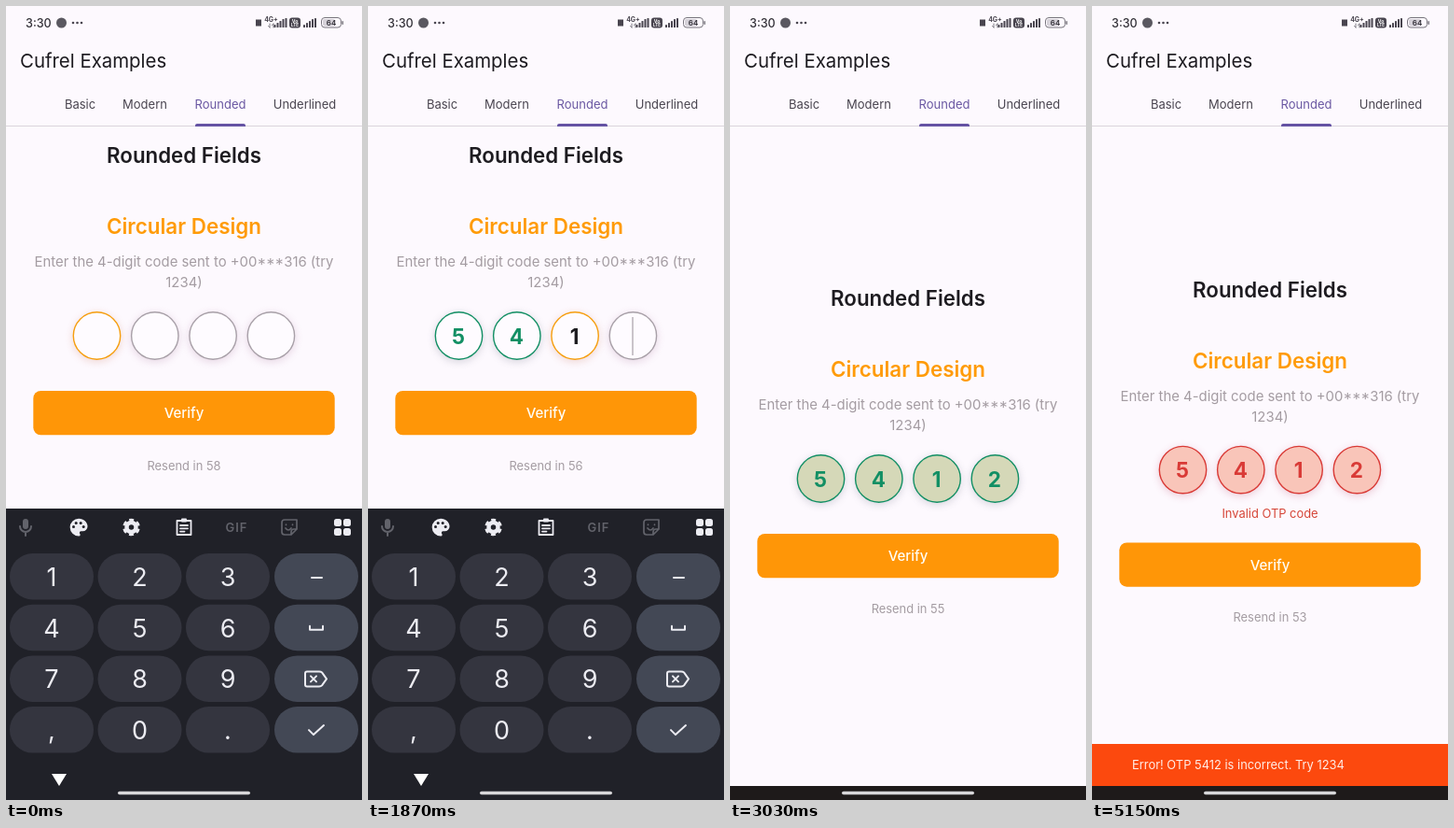
These frames come from a looping animation (382 px wide and 850 px high, 5.19 s). An HTML page:

```html
<!DOCTYPE html>
<html lang="en">
<head>
<meta charset="utf-8">
<title>One-time code entry</title>
<style>
html, body { margin: 0; height: 100%; overflow: hidden; background: #fdf9fe; }
svg { display: block; width: 100vw; height: 100vh; font-family: Inter, Roboto, sans-serif; }
.line { fill: none; stroke: currentColor; stroke-width: 2; stroke-linecap: round; stroke-linejoin: round; }
</style>
</head>
<body>
<svg id="stage" viewBox="0 0 382 850"></svg>
<script>
const LOOP = 5190;
const stage = document.getElementById('stage');

const typed = [700, 1300, 1780, 2540];
const digits = '5412';
const hideAt = 2575, tapAt = 4260, errorAt = 4360, snackAt = 4381;

const page = '#fdf9fe', title = '#1d1b20', label = '#49454f', muted = '#a49ca2';
const board = '#202128', keyFill = '#34353f', enterFill = '#434855';
const glyph = '#ececf2', dimGlyph = '#62636b';

const paper = [254, 251, 255], dark = [29, 27, 32], grey = [168, 160, 168];
const orange = [246, 158, 14], green = [18, 143, 100], red = [217, 58, 54];
const mint = [198, 225, 192], sand = [213, 216, 184], pink = [249, 197, 185];

const ramp = (t, from, to) => Math.min(1, Math.max(0, (t - from) / (to - from)));
const easeOut = p => 1 - (1 - p) ** 3;
const mix = (a, b, p) => a.map((v, i) => v + (b[i] - v) * p);
const rgb = c => `rgb(${c.map(Math.round)})`;

// Text whose capitals are centred on y
const text = (s, x, y, size, fill, weight = 400, anchor = 'middle') =>
  `<text x="${x}" y="${y + size * .363}" font-size="${size}" fill="${fill}" font-weight="${weight}" text-anchor="${anchor}">${s}</text>`;
const rect = (x, y, w, h, r, fill, more = '') =>
  `<rect x="${x}" y="${y}" width="${w}" height="${h}" rx="${r}" fill="${fill}" ${more}/>`;
const circle = (x, y, r, fill, more = '') =>
  `<circle cx="${x}" cy="${y}" r="${r}" fill="${fill}" ${more}/>`;
const line = (d, more = '') => `<path class="line" d="${d}" ${more}/>`;
const group = (x, y, body, more = '') => `<g transform="translate(${x} ${y})" ${more}>${body}</g>`;

const bars = x => [3, 5, 7, 9, 10].map((h, i) => rect(x + i * 3, 23 - h, 2, h, .6, label)).join('');

const header =
  text('3:30', 21, 18, 12.6, '#333138', 500, 'start') +
  circle(59.5, 18, 5.5, '#5a5860') +
  [72, 76.5, 81].map(x => circle(x, 18, 1.3, label)).join('') +
  rect(268, 14.5, 6, 7, 0, label) +
  text('4G+', 284.5, 14.5, 7, label, 700) +
  line('M283 19v4m-1.5-1.5l1.5 1.5M287 23v-4m-1.5 1.5l1.5-1.5', 'style="color:#7d7a82;stroke-width:1"') +
  bars(287.5) +
  rect(304, 12.5, 12, 11, 3, label) +
  text('Vo', 310, 16, 5, '#fff', 700) + text('LTE', 310, 20.5, 4.5, '#fff', 700) +
  bars(319) +
  rect(338.5, 12.5, 21, 10.5, 3.5, page, 'stroke="#77747c"') +
  rect(340, 14, 13, 7.5, 2, '#d5d1d8') + rect(360.5, 16, 1.5, 4, .7, '#77747c') +
  text('64', 349, 18, 8, '#333138', 600) +
  text('Cufrel Examples', 15, 58.5, 20.4, title, 400, 'start') +
  [['Basic', 79.5], ['Modern', 149], ['Rounded', 230], ['Underlined', 320.5]]
    .map(([s, x]) => text(s, x, 105.5, 13, s == 'Rounded' ? '#6a58a2' : label)).join('') +
  rect(0, 128, 382, 1, 0, '#dbd5dc') +
  '<path d="M203 129v-1q0-2 2-2h50q2 0 2 2v1z" fill="#6553a4"/>';

const icon = (x, color, body) => group(x, 558, body, `style="color:${color}"`);

const palette =
  '<path transform="translate(-12.5 -12.5) scale(1.05)" fill="currentColor" d="M12 3a9 9 0 0 0 0 18q1.5 0 1.5-1.5c0-1-.8-1-.8-2q0-1.5 1.5-1.5H16a5 5 0 0 0 5-5c0-4.4-4-8-9-8z"/>' +
  [[-5.5, -.5], [-2.8, -4.5], [2.2, -4.5], [5.2, -.5]].map(([x, y]) => circle(x, y, 1.5, board)).join('');
const gear = '<g fill="none" stroke="currentColor"><circle r="5" stroke-width="4.5"/>' +
  '<circle r="7.8" stroke-width="3" stroke-dasharray="4.8 3.368" transform="rotate(12)"/></g>';
const clipboard = line('M-7.5-7h15v15h-15zM-4-2h8M-4 1.3h8M-4 4.6h4.5', 'style="stroke-width:1.8"') +
  rect(-3, -9.5, 6, 4, 1, 'currentColor');
const sticker = line('M-5-8h13v10l-6 6h-7q-3 0-3-3v-10q0-3 3-3zM8 2h-3q-3 0-3 3v3M-4 1q3 4 6 0M-3.5-3v.5M3.5-3v.5',
  'style="stroke-width:1.7"');

const toolbar = icon(78, glyph, palette) + icon(134.5, glyph, gear) + icon(191, glyph, clipboard) +
  icon(247, dimGlyph, `<g letter-spacing="1">${text('GIF', .5, 0, 13, 'currentColor', 600)}</g>`) +
  icon(304, dimGlyph, sticker);
const mic = icon(21, dimGlyph, rect(-3, -9, 6, 11, 3, 'currentColor') + line('M-6-1a6 6 0 0 0 12 0M0 6v3'));
const dots = [352, 362].map(x => [549, 559].map(y => rect(x, y, 8, 8, 2.5, glyph)).join('')).join('');

const symbols = [
  line('M-5 1h11'),
  line('M-7-2v4h14v-4'),
  line('M-10-8h13q2 0 3 1l5 7-5 7q-1 1-3 1h-13q-2 0-2-2v-12q0-2 2-2zM-6-3l6 6M0-3l-6 6'),
  line('M-8 0l5 5 11-10'),
];
const keys = ['123', '456', '789', ',0.'].map((row, r) => {
  const y = 586 + r * 54.7;
  const plain = [...row].map((s, c) =>
    rect(4 + c * 94.5, y, 90, 49.5, 24.7, keyFill) + text(s, 49 + c * 94.5, y + 25, 27, glyph)).join('');
  return plain + rect(288, y, 90, 49.5, 24.7, enterFill) + group(333, y + 25, symbols[r], `style="color:${glyph}"`);
}).join('');

function keyboard(drop) {
  return group(0, drop,
    rect(0, 538, 382, 312, 0, board) + mic + dots +
    `<g opacity="${1 - ramp(drop, 0, 150)}">${toolbar}</g>` +
    `<g opacity="${1 - ramp(drop, 0, 312) * .65}">${keys}</g>` +
    '<path d="M49 822h16l-8 13z" fill="#fff"/>');
}

function field(i, t, count) {
  const x = 97.5 + i * 62.3;
  const settle = at => ramp(t, at + 150, at + 300);
  const done = settle(typed[i]), failed = ramp(t, 4480, 4700);
  const focus = i ? settle(typed[i - 1]) : 1;
  const edge = mix(mix(mix(grey, orange, focus), green, done), red, failed);
  const ink = mix(mix(dark, green, done), red, failed);
  const tint = mix(mix(paper, mint, ramp(t, 2540, 2650)), sand, ramp(t, 2720, 3000));
  const shade = mix([215, 175, 205], edge, .25).map(Math.round);
  const since = t - (count ? typed[count - 1] : 300);
  const cursor = i == count && since >= 0 && since % 1000 < 500;
  return circle(x, 353, 25.2, rgb(mix(tint, pink, failed)),
      `stroke="${rgb(edge)}" stroke-width="1.4" style="filter:drop-shadow(0 2px 4px rgba(${shade},.45))"`) +
    (i < count ? text(digits[i], x - .5, 353.5, 22.5, rgb(ink), 700) : '') +
    (cursor ? rect(x - 1, 333, 1.2, 41, 0, rgb(mix(grey, dark, focus * .8))) : '');
}

function button(t) {
  const grow = ramp(t, tapAt, 4560);
  const fade = 1 - ramp(t, 4440, 4680);
  const shape = (fill, more) => rect(29.3, 412, 323.4, 47.3, 8, fill, more);
  const glow = grow > 0 && fade > 0 ? shape('url(#glow)', `opacity="${fade}"`) : '';
  return `<radialGradient id="glow" gradientUnits="userSpaceOnUse" cx="268" cy="436" r="${20 + 165 * grow}">
      <stop offset=".3" stop-color="#f3ad00"/><stop offset="1" stop-color="#f3ad00" stop-opacity="0"/></radialGradient>` +
    shape('#ff9607') + glow + text('Verify', 191, 436, 15, '#fffdf6', 450);
}

function draw(t) {
  const drop = 312 * easeOut(ramp(t, hideAt, hideAt + 300));
  const shift = Math.min(drop / 2, 153);
  const failed = t >= errorAt;
  const gap = failed ? 9.4 : 0;
  const count = typed.filter(at => t >= at).length;
  const left = 58 - Math.floor((t + 700) / 1000);
  const snack = 835 - 45 * easeOut(ramp(t, snackAt, snackAt + 250));

  stage.innerHTML = rect(0, 0, 382, 850, 0, page) + header +
    group(0, shift - gap,
      text('Rounded Fields', 191, 160, 22.3, title, 600) +
      text('Circular Design', 191, 236, 22.4, '#ff9b08', 600) +
      text('Enter the 4-digit code sent to +00***316 (try', 191, 274, 14.9, muted) +
      text('1234)', 191, 295.5, 14.9, muted) +
      [0, 1, 2, 3].map(i => field(i, t, count)).join('') +
      (failed ? text('Invalid OTP code', 191, 399.5, 12.9, '#d64638') : '')) +
    group(0, shift + gap, button(t) + text('Resend in ' + left, 191, 492, 12.9, muted)) +
    (t >= snackAt ? rect(0, snack, 382, 850 - snack, 0, '#fc490e') +
      text('Error! OTP 5412 is incorrect. Try 1234', 43, snack + 22, 12.9, '#ffeee8', 400, 'start') : '') +
    rect(0, 835, 382, 15, 0, '#1e1a1a') +
    (drop < 312 ? keyboard(drop) : '') +
    rect(120, 840.7, 142, 3.6, 1.8, '#d8d7da');
}

function tick() {
  draw(performance.now() % LOOP);
  requestAnimationFrame(tick);
}
tick();
</script>
</body>
</html>
```
